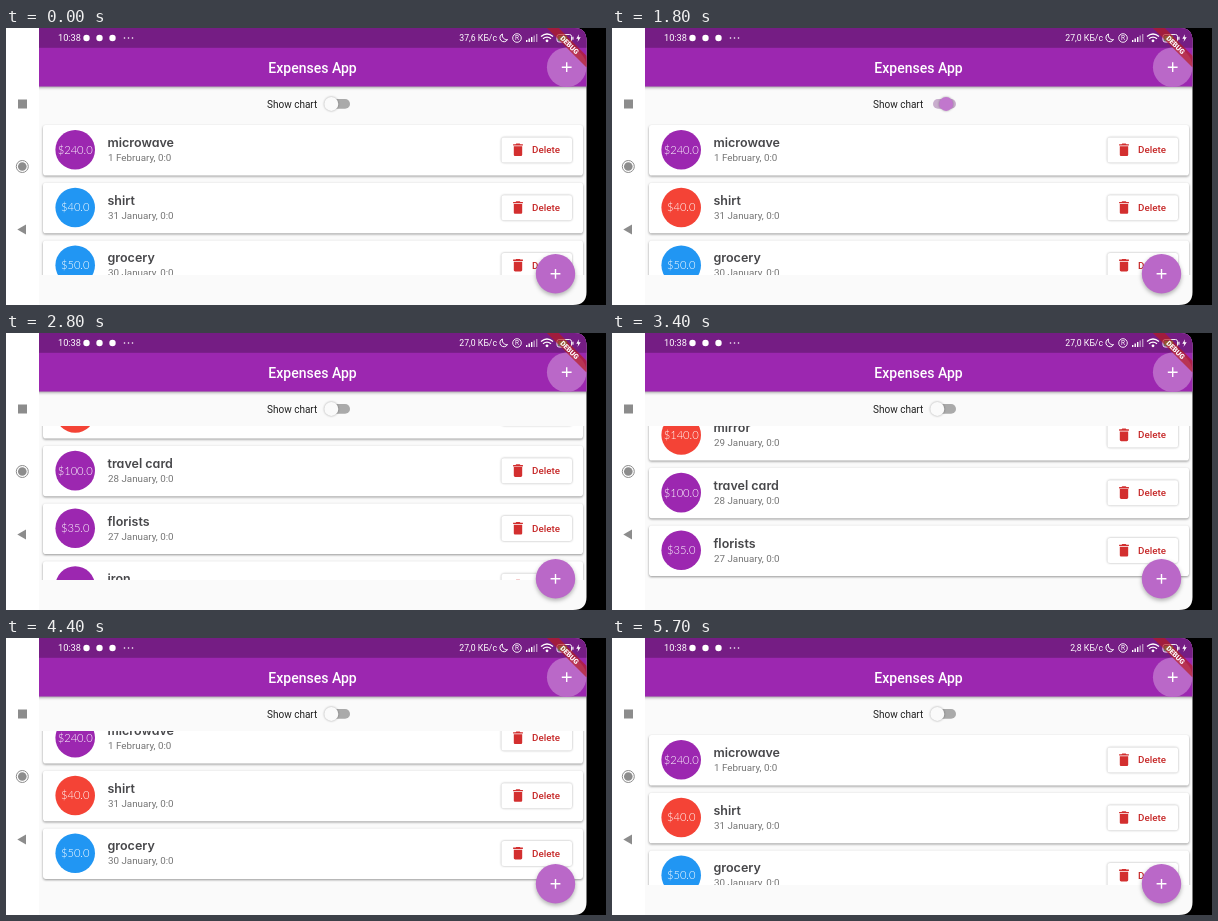
An HTML page for the animation above (5.8 s loop, 600 by 277 pixels).

```html
<!DOCTYPE html>
<html lang="en">
<head>
<meta charset="utf-8">
<title>Expenses App</title>
<style>
  html, body { margin: 0; width: 100%; height: 100%; overflow: hidden; background: #000; }
  svg { display: block; width: 600px; height: 277px; font: 9.8px Roboto, sans-serif; }
  .card { fill: #fff; filter: drop-shadow(0 1.3px 1.3px rgba(0,0,0,.4)); }
  .button { fill: #fff; filter: drop-shadow(0 .8px .9px rgba(0,0,0,.32)); }
  .name { font: 600 12.5px Inter, Lato, sans-serif; font-feature-settings: "cv11"; fill: #47474a; }
  .price { font: 300 11.2px Lato, sans-serif; fill: #fff; text-anchor: middle; }
  .date { fill: #757575; }
  .delete { font-weight: 500; fill: #c62828; }
  .mid { text-anchor: middle; }
  .float { filter: drop-shadow(0 2px 2px rgba(0,0,0,.3)); }
</style>
</head>
<body>
<svg viewBox="0 0 600 277">
  <defs>
    <clipPath id="screen"><path d="M33 0H568Q580.5 0 580.5 13V264Q580.5 277 567 277H33Z"/></clipPath>
    <clipPath id="viewport"><rect x="33" y="93" width="548" height="154"/></clipPath>
  </defs>
  <rect width="600" height="277" fill="#000"/>
  <rect width="34" height="277" fill="#fff"/>
  <g fill="#8c8c8c">
    <rect x="12" y="71.5" width="9" height="9"/>
    <circle cx="16.3" cy="138.5" r="4.3"/>
    <circle cx="16.3" cy="138.5" r="6" fill="none" stroke="#8c8c8c"/>
    <path d="M20 196.5V206.500L11.300 201.500Z"/>
  </g>

  <g clip-path="url(#screen)">
    <rect x="33" width="548" height="277" fill="#fafafa"/>
    <g id="list" clip-path="url(#viewport)"><g id="rows"></g></g>
    <g id="chart"></g>

    <text x="261" y="79.500" font-size="10" fill="#212121">Show chart</text>
    <rect id="track" x="321" y="71" width="23" height="9.800" rx="4.900"/>
    <circle id="thumb" cy="75.900" r="7" style="filter:drop-shadow(0 .7px .8px rgba(0,0,0,.35))"/>

    <rect x="25" y="0" width="565" height="58.500" fill="#9c27b0" style="filter:drop-shadow(0 1.500px 1.800px rgba(0,0,0,.4))"/>
    <rect x="33" width="548" height="19.800" fill="#751d84"/>
    <text x="306.500" y="45" font-size="14" font-weight="500" fill="#fff" class="mid">Expenses App</text>
    <circle cx="560.700" cy="39.200" r="19.800" fill="#ba68c8"/>
    <path d="M555.800 39.200h9.800M560.700 34.300v9.800" stroke="#fff" stroke-width="1.400"/>

    <g fill="#fff">
      <text x="52" y="13.200" font-size="9.200">10:38</text>
      <circle cx="80.500" cy="10" r="3.200"/><circle cx="93.500" cy="10" r="3.200"/><circle cx="106.500" cy="10" r="3.200"/>
      <circle cx="118.500" cy="10" r=".8"/><circle cx="122.500" cy="10" r=".8"/><circle cx="126.500" cy="10" r=".8"/>
      <text id="speed" x="491" y="13" font-size="8.700" text-anchor="end"></text>
      <path d="M496.500 6A4 4 0 1 0 501.500 11.500A4.300 4.300 0 0 1 496.500 6Z" fill="none" stroke="#fff"/>
      <circle cx="511" cy="10" r="4.300" fill="none" stroke="#fff" stroke-width=".9"/>
      <text x="511" y="12.400" font-size="6.500" class="mid">R</text>
      <path d="M520 12h1.400v2h-1.400zM522.500 10.500h1.400v3.500h-1.400zM525 9h1.400v5h-1.400z"/>
      <path d="M527.500 7.500h1.400v6.500h-1.400zM530 6h1.400v8h-1.400z" opacity=".5"/>
      <path d="M535 8.500Q541 3.500 547 8.500M537 10.700Q541 7.500 545 10.700" fill="none" stroke="#fff" stroke-width="1.300"/>
      <circle cx="541" cy="12.800" r="1.400"/>
      <rect x="551" y="6.500" width="14.500" height="7.500" rx="2" fill="none" stroke="#fff" stroke-width=".9"/>
      <rect x="552.300" y="7.800" width="8.500" height="4.900" fill="#43d15b"/>
      <rect x="566.300" y="8.700" width="1.200" height="3"/>
      <path d="M573 6.200L570.300 10.700H572.300L571.500 14L574.700 9.300H572.600Z"/>
    </g>
    <g transform="translate(580.5) rotate(45)">
      <rect x="-28" y="19.600" width="56" height="8.400" fill="#b71c1c" fill-opacity=".68"/>
      <text y="26.400" font-size="7.100" font-weight="900" fill="#fff" class="mid">DEBUG</text>
    </g>

    <circle class="float" cx="549.500" cy="245.800" r="19.700" fill="#ba68c8"/>
    <path d="M544.600 245.800h9.800M549.500 240.900v9.800" stroke="#fff" stroke-width="1.400"/>
  </g>
</svg>
<script>
const LOOP = 5800, FRAME = 100, ROW = 57.7;
const CHART_ON = 600, CHART_OFF = 1800;
const PURPLE = '#9c27b0', BLUE = '#2196f3', RED = '#f44336';
const $ = id => document.getElementById(id);

const expenses = [
  ['microwave', 240, '1 February', PURPLE, 'T'],
  ['shirt', 40, '31 January', BLUE, 'M'],
  ['grocery', 50, '30 January', BLUE, 'S'],
  ['mirror', 140, '29 January', RED, 'S'],
  ['travel card', 100, '28 January', PURPLE, 'F'],
  ['florists', 35, '27 January', PURPLE, 'T'],
  ['iron', 60, '26 January', PURPLE, 'W']
];

// [time, list offset]
const scrollKeys = [
  [0, 0], [2200, 0], [2400, 27], [2600, 123], [2800, 215], [3050, 250],
  [3200, 240], [3400, 193], [3600, 85], [3800, 8], [3900, 0], [4200, 0],
  [4400, 22], [4600, 78], [4800, 120], [4950, 128], [5200, 95],
  [5400, 40], [5600, 4], [5700, 0], [5800, 0]
];

$('rows').innerHTML = expenses.map(([name, price, date, color], i) => `
  <g transform="translate(0 ${i * ROW})">
    <rect class="card" x="37" y="97" width="540" height="50.5" rx="2.8"/>
    <circle class="avatar" cx="69.200" cy="121.800" r="19.800" fill="${color}"/>
    <text class="price" x="69.200" y="125.800">$${price}.0</text>
    <text class="name" x="101.500" y="119">${name}</text>
    <text class="date" x="102" y="133">${date}, 0:0</text>
    <rect class="button" x="495.500" y="109.500" width="70.500" height="25" rx="2.500"/>
    <path transform="translate(503.600 113.400) scale(.7)" fill="#d32f2f"
      d="M6 19c0 1.100.9 2 2 2h8c1.100 0 2-.9 2-2V7H6v12zM19 4h-3.500l-1-1h-5l-1 1H5v2h14V4z"/>
    <text class="delete" x="526" y="125.400">Delete</text>
  </g>`).join('');
const shirtAvatar = document.querySelectorAll('.avatar')[1];

const total = expenses.reduce((sum, e) => sum + e[1], 0);
$('chart').innerHTML = '<rect class="card" x="47" y="107" width="520" height="126" rx="2.8"/>' +
  [...expenses].reverse().map(([, price, , , day], i) => {
    const x = 54 + (i + .5) * 506 / 7, h = 67 * price / total;
    return `
    <text class="mid" x="${x}" y="126" fill="#212121">$${price}</text>
    <rect x="${x - 3.5}" y="136" width="7" height="67" rx="3.500" fill="#dcdcdc" stroke="#9e9e9e" stroke-width=".7"/>
    <rect x="${x - 3.5}" y="${203 - h}" width="7" height="${h}" rx="3.500" fill="${PURPLE}"/>
    <text class="mid" x="${x}" y="221" fill="#212121">${day}</text>`;
  }).join('');

function slope(keys, i) {
  const a = keys[i - 1], b = keys[i], c = keys[i + 1];
  if (!a || !c || (b[1] - a[1]) * (c[1] - b[1]) <= 0) return 0;
  return (c[1] - a[1]) / (c[0] - a[0]);
}

function spline(keys, t) {
  const i = keys.findIndex((k, n) => n + 1 < keys.length && t < keys[n + 1][0]);
  const [t0, y0] = keys[i], [t1, y1] = keys[i + 1];
  const d = t1 - t0, u = (t - t0) / d, v = 1 - u;
  return v * v * (1 + 2 * u) * y0 + u * u * (1 + 2 * v) * y1 +
    u * v * d * (v * slope(keys, i) - u * slope(keys, i + 1));
}

const mix = (a, b, u) => `rgb(${a.map((v, i) => Math.round(v + (b[i] - v) * u))})`;
const settle = [.64, .1, 0];

function switchPosition(t) {
  if (t < CHART_ON) return 0;
  const on = t < CHART_OFF;
  const left = settle[Math.min(2, (t - (on ? CHART_ON : CHART_OFF)) / FRAME)];
  return on ? 1 - left : left;
}

function render(t) {
  const chartShown = t >= CHART_ON && t < CHART_OFF;
  $('chart').style.display = chartShown ? '' : 'none';
  $('list').style.display = chartShown ? 'none' : '';
  $('rows').setAttribute('transform', `translate(0 ${-spline(scrollKeys, t)})`);
  shirtAvatar.setAttribute('fill', t < CHART_OFF ? BLUE : RED);

  const on = switchPosition(t), tint = Math.min(1, on * 1.4);
  $('thumb').setAttribute('cx', 325.3 + 13.8 * on);
  $('thumb').setAttribute('fill', mix([250, 250, 250], [186, 104, 200], tint));
  $('track').setAttribute('fill', mix([170, 170, 170], [218, 177, 225], on));
  $('speed').textContent = (t < 1200 ? '37,6' : t < 4800 ? '27,0' : '2,8') + ' КБ/с';
}

const start = performance.now();
function tick() {
  const t = (performance.now() - start) % LOOP;
  render(Math.floor(t / FRAME) * FRAME);
  requestAnimationFrame(tick);
}
tick();
</script>
</body>
</html>
```
